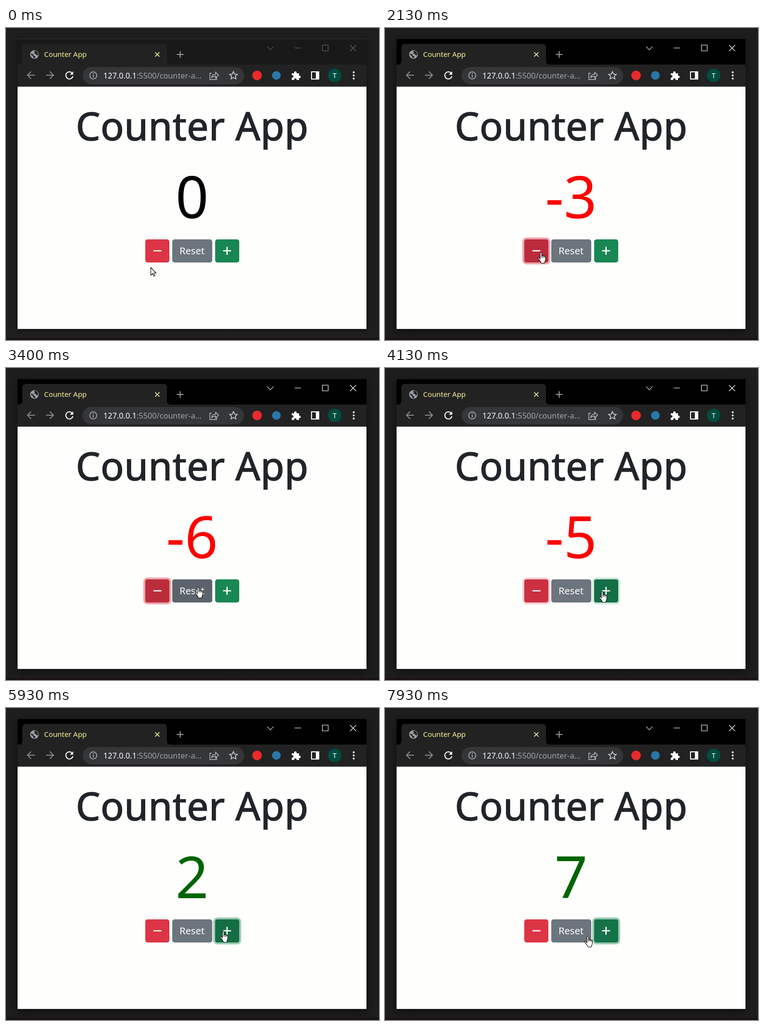
An HTML page for the animation above (8 s loop, 774 by 648 pixels).

```html
<!DOCTYPE html>
<html lang="en">
<head>
<meta charset="utf-8">
<title>Counter App</title>
<style>
  html, body { margin: 0; width: 100%; height: 100%; overflow: hidden; background: #1e1e1e; }
  #frame {
    position: absolute; left: 24px; top: 22px; width: 724px; height: 604px;
    box-shadow: 0 2px 10px rgba(0, 0, 0, .4);
  }
  .active #frame { box-shadow: 0 6px 20px rgba(0, 0, 0, .5); }
  svg { position: absolute; left: 0; top: 0; font-family: "Noto Sans", "Open Sans", sans-serif; }
  #titlebar { fill: #191919; }
  #edge { stroke: #363636; }
  #controls { stroke: #666; stroke-width: 1.1; fill: none; }
  #traces { stroke: #282828; }
  .active #titlebar { fill: #000; }
  .active #edge { stroke: #1b1b1b; }
  .active #controls { stroke: #fff; }
  .active #traces { stroke: #222; }
  /* a thin outline gives the heading its medium weight */
  #heading { fill: #212529; stroke: #212529; stroke-width: 1.6; letter-spacing: .7px; }
</style>
</head>
<body>
<div id="frame"></div>
<svg width="774" height="648" viewBox="0 0 774 648">
  <path d="M0 646H774" stroke="#1a1114" stroke-width="4"/>
  <path id="traces" d="M450 632.5H483M503 632.5H517"/>

  <!-- title bar and tab -->
  <path id="titlebar" d="M24 22H748V78H24Z"/>
  <path id="edge" d="M24 22.5H748"/>
  <path d="M24 76H748V122H24Z" fill="#222"/>
  <path d="M26 76q8 0 8-8V41q0-8 8-8H326q8 0 8 8V68q0 8 8 8Z" fill="#222"/>
  <circle cx="59" cy="55" r="9" fill="#9aa0a6"/>
  <path d="M52 53l5 2 1 3 3 1-1 4-4-2v-3l-4-2ZM58 48l4-1 4 4 1 5-3 1-2-3-4-1 2-2Z" fill="#222"/>
  <text x="79" y="60" font-size="14.9" fill="#fbf39c">Counter App</text>
  <path stroke="#fbf39c" stroke-width="1.7" d="M309.5 50.5l9 9m0-9l-9 9"/>
  <path stroke="#9a9a9a" stroke-width="2" d="M354.5 55h14M361.5 48v14"/>
  <path id="controls" d="M542 38.5l6.5 7 6.5-7M599 41.5h13M656.5 35.5h12v12h-12ZM714 35.5l12.5 12.5m0-12.5L714 48"/>

  <!-- toolbar -->
  <rect x="159" y="81" width="335" height="36" rx="18" fill="#353638"/>
  <g fill="none" stroke-width="2">
    <path stroke="#85888b" d="M60 98H44.5m7.5-7.5L44.5 98l7.5 7.5M83 98h15.5M91 90.5l7.5 7.5-7.5 7.5"/>
    <path stroke="#fff" d="M137.5 94a7.4 7.4 0 1 0 1.3 6"/>
    <circle cx="181" cy="98.5" r="7.3" stroke="#a4a7aa" stroke-width="1.8"/>
    <path stroke="#a4a7aa" d="M181 97.5v5M181 94v2"/>
    <path stroke="#c0c3c6" stroke-width="1.4" d="M427 94h-4v13h14v-4M427 103c0-5 4-7 8-7v-4l6 6-6 6v-4c-4 0-6 1-8 3Z"/>
    <path stroke="#d0d3d6" stroke-width="1.6" d="M472 90.5l2.4 5.2 5.6.6-4.2 3.8 1.2 5.6-5-2.9-5 2.9 1.2-5.6-4.2-3.8 5.6-.6Z"/>
  </g>
  <path fill="#fff" d="M139.5 90v7h-7Z"/>
  <text x="202" y="105" font-size="16.3" fill="#a2a5a8"><tspan fill="#fff">127.0.0.1</tspan>:5500/counter-a...</text>
  <circle cx="521" cy="98.5" r="10" fill="#ea2a2c"/>
  <circle cx="561" cy="98.5" r="9" fill="#2a78a8"/>
  <path fill="#fff" d="M593 94h5v-1.5a2.5 2.5 0 0 1 5 0V94h5v5h1a2.5 2.5 0 0 1 0 5h-1v4h-5v-1a2.5 2.5 0 0 0-5 0v1h-5v-5h1a2.5 2.5 0 0 0 0-5h-1Z"/>
  <path fill="#fff" fill-rule="evenodd" d="M633 90h17v17h-17ZM635 92v13h8V92Z"/>
  <circle cx="682" cy="98.5" r="14" fill="#004d40"/>
  <text x="682" y="104" font-size="14.5" fill="#fff" text-anchor="middle">T</text>
  <g fill="#fff">
    <circle cx="721.5" cy="92" r="2"/><circle cx="721.5" cy="98.5" r="2"/><circle cx="721.5" cy="105" r="2"/>
  </g>

  <!-- page -->
  <path d="M24 122H748V625H24Z" fill="#fefefd"/>
  <path d="M24 121.5H748" stroke="#4a4b4d"/>
  <g text-anchor="middle">
    <text id="heading" x="386.5" y="233" font-size="80">Counter App</text>
    <text id="count" x="386" y="395" font-size="120">0</text>
    <g id="buttons"></g>
    <text x="386" y="470" font-size="20" fill="#fff">Reset</text>
  </g>
  <path d="M307 462.7H321.5M451.5 462.7H466M458.7 455.5V470" stroke="#fff" stroke-width="2.6" stroke-linecap="round"/>

  <g id="cursor" fill="#fff" stroke="#000" stroke-width="1.1" stroke-linejoin="round">
    <path id="arrow" d="M.5.5V16.5L4.2 13 6.6 18.6 9 17.6 6.6 12H11.5Z"/>
    <g id="hand" transform="translate(-6.5 0)">
      <path d="M5.5 15V2.3a1.6 1.6 0 0 1 3.2 0V8a1.5 1.5 0 0 1 2.8.5 1.5 1.5 0 0 1 2.7.8 1.4 1.4 0 0 1 2.5 1V16c0 2.5-1.7 3.5-1.7 5v1q0 1.5-1.5 1.5H8.7Q7.2 23.5 7.2 22C6 18.5 3 16.5.8 13.2.2 11.5 2.5 11 3.5 12.3L5.5 14.5Z"/>
      <path d="M8.7 8v4M11.5 8.5V12M14.2 9.5V12" fill="none"/>
    </g>
  </g>
</svg>
<script>
const LOOP = 8000, FADE = 150, PRESS = 70;
const ACTIVATED = 1130, FOCUS_MOVES = 4060;

// Release times of each click, in ms
const minusClicks = [1190, 1520, 1850, 2170, 2440, 2700];
const plusClicks = [4120, 4400, 4680, 4960, 5270, 5500, 5740, 5910, 6290, 6500, 6700, 6910, 7360];

// colors: normal, hover, pressed
const buttons = [
  { x: 289, w: 50, colors: ['#dc3545', '#bb2d3b', '#b02a37'], ring: '#e15361',
    lit: [240, FOCUS_MOVES], focus: [ACTIVATED, FOCUS_MOVES], clicks: minusClicks },
  { x: 345, w: 83, colors: ['#6c757d', '#5c636a', '#565e64'], ring: '#828a91',
    lit: [3180, 3610], focus: [LOOP, LOOP], clicks: [] },
  { x: 434, w: 50, colors: ['#198754', '#157347', '#146c43'], ring: '#3c996e',
    lit: [3640, LOOP], focus: [FOCUS_MOVES, LOOP], clicks: plusClicks },
];

// time, x, y of the pointer's hot spot
const path = [
  [30, 300, 497], [600, 322.5, 465], [3080, 322.5, 465], [3400, 398, 454],
  [3780, 449.5, 463], [7620, 449.5, 463], [7930, 419.5, 473],
];

const $ = id => document.getElementById(id);
const clamp = v => Math.max(0, Math.min(1, v));
const smooth = v => v * v * (3 - 2 * v);
const ramp = (t, start) => smooth(clamp((t - start) / FADE));
const pulse = (t, [on, off]) => ramp(t, on) - ramp(t, off);

function addRect(x, y, width, height, rx, fill) {
  const rect = document.createElementNS('http://www.w3.org/2000/svg', 'rect');
  Object.entries({ x, y, width, height, rx, fill }).forEach(([k, v]) => rect.setAttribute(k, v));
  return $('buttons').appendChild(rect);
}

for (const b of buttons) {
  b.halo = addRect(b.x - 4, 435, b.w + 8, 56, 8.8, b.ring);
  b.layers = b.colors.map(color => addRect(b.x, 439, b.w, 48, 4.8, color));
}

function pointerAt(t) {
  let i = 0;
  while (i < path.length - 2 && t > path[i + 1][0]) i++;
  const [t0, x0, y0] = path[i], [t1, x1, y1] = path[i + 1];
  const k = smooth(clamp((t - t0) / (t1 - t0)));
  return [x0 + (x1 - x0) * k, y0 + (y1 - y0) * k];
}

function render(t) {
  const done = clicks => clicks.filter(c => c <= t).length;
  const value = done(plusClicks) - done(minusClicks);
  $('count').textContent = value;
  $('count').setAttribute('fill', value < 0 ? '#f00' : value > 0 ? '#006400' : '#000');

  for (const b of buttons) {
    b.halo.style.opacity = pulse(t, b.focus) / 2;
    b.layers[1].style.opacity = pulse(t, b.lit);
    b.layers[2].style.opacity = b.clicks.reduce((sum, c) => sum + pulse(t, [c - PRESS, c]), 0);
  }

  const [x, y] = pointerAt(t);
  const over = buttons.some(b => x >= b.x && x <= b.x + b.w && y >= 439 && y <= 487);
  $('cursor').setAttribute('transform', `translate(${Math.round(x)} ${Math.round(y)})`);
  $('hand').style.display = over ? '' : 'none';
  $('arrow').style.display = over ? 'none' : '';
  document.body.classList.toggle('active', t >= ACTIVATED);
}

const start = performance.now();
function tick() {
  render((performance.now() - start) % LOOP);
  requestAnimationFrame(tick);
}
tick();
</script>
</body>
</html>
```
